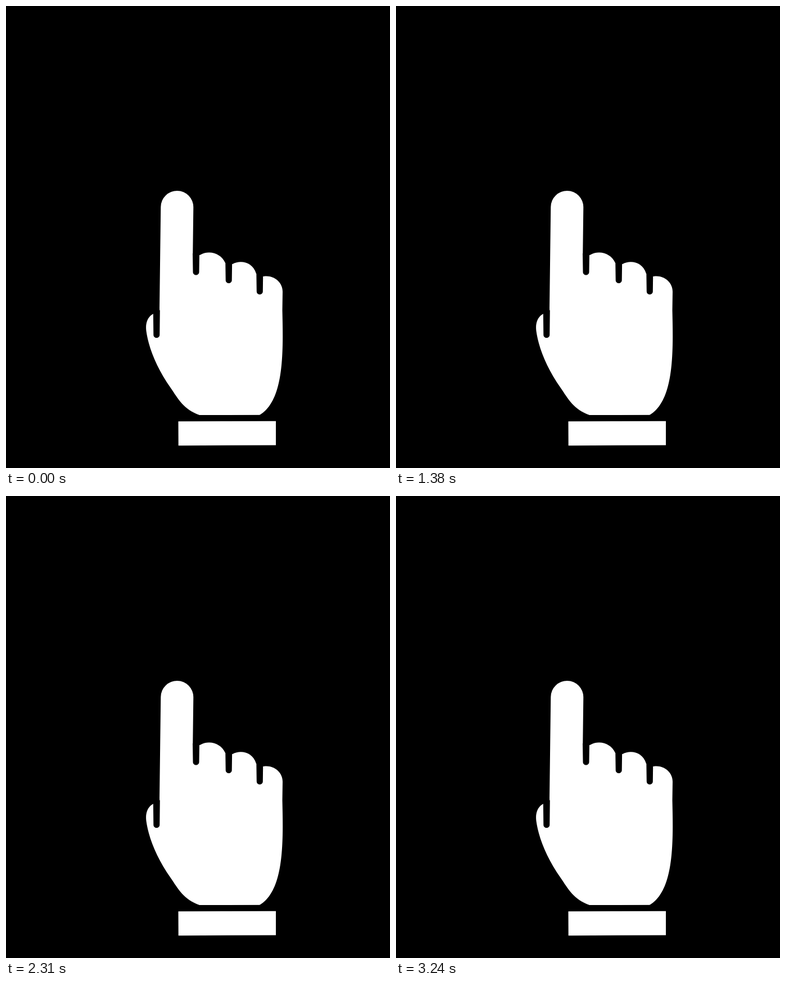
Animation, 683 px wide and 820 px high, one loop 3.84 s. Source, as an HTML page:

```html
<!DOCTYPE html>
<html lang="en">
<head>
<meta charset="utf-8">
<title>Tapping hand</title>
<style>
  html, body { margin: 0; width: 100%; height: 100%; overflow: hidden; background: #000; }
  svg { display: block; width: 100%; height: 100%; }
  .skin { fill: #fff; stroke: #000; stroke-width: 22; stroke-linejoin: round; paint-order: stroke; }
  .finger { fill: none; stroke: #fff; stroke-linecap: round; }
  .finger.edge { stroke: #000; }
</style>
</head>
<body>
<svg viewBox="0 0 683 820">
  <circle id="ring" cx="294.5" cy="355.8" fill="none" stroke="#fff"/>
  <path id="edge" class="finger edge"/>
  <path id="palm" class="skin"/>
  <path id="index" class="finger"/>
  <path id="gaps"/>
  <path id="cuff" class="skin"/>
</svg>
<script>
const LOOP = 3840, STEP = 30, FIRST_TAP = 780, TAP_GAP = 930, TAPS = 3;
const PRESS_TIME = 480, RING_START = 150, RING_END = 600;

const index = 'M302 537 C302.8 477 303.5 417 304.3 357';
const cuff = 'M306.5 737.2 Q393 737 480 736.8 L480 779.6 Q393 779.8 306.7 780.2 Z';
const knuckles = `L345 442 C361 432 383 439 390 456
  L403 458 C418 450 439 455 445 475 L458 480 C476 477 492 490 492 507`;
const palm = `M262.5 546 L273 540 L332 442 ${knuckles}
  L491.5 540 C493 610 496 700 451 726 L344 726
  C316 716 306 697 293 678 C268 642 254 608 249.5 577 C247 558 256 549 262.5 546 Z`;

// Dark slot between fingers, slightly wider at the top, with a round end.
const gap = (x, top, bottom) => `M${x - 6} ${top} L${x - 5.5} ${bottom}
  C${x - 5.5} ${bottom + 7.3} ${x + 5.5} ${bottom + 7.3} ${x + 5.5} ${bottom} L${x + 6} ${top} Z`;
const gaps = gap(267.8, 540, 583.5) + gap(338, 439, 472) + gap(396.2, 453, 486.5) + gap(451.3, 472, 506.5);

const set = (id, attributes) => {
  for (const name in attributes) document.getElementById(id).setAttribute(name, attributes[name]);
};

// Tilts every point of a path; the lean grows with the cube of the height above the wrist.
const bend = (path, amount) => path.replace(/([\d.]+) ([\d.]+)/g, (_, px, py) => {
  const x = +px, y = +py, height = (737 - y) / 400, lean = height ** 3;
  const right = from => Math.max(0, x - from);
  const dx = 0.018 * right(320) + 3.5 * height - lean * (14 + 0.2 * right(345));
  const dy = 0.26 * lean * (400 - x) - 0.035 * right(400);
  return `${x + dx * amount} ${y + dy * amount}`;
});

function drawHand(press) {
  const finger = bend(index, press), width = 58 - 1.4 * press;
  set('edge', { d: finger, 'stroke-width': width + 22 });
  set('index', { d: finger, 'stroke-width': width });
  set('palm', { d: bend(palm, press) });
  set('gaps', { d: bend(gaps, press) });
  set('cuff', { d: bend(cuff, press) });
}

function drawRing(u) {
  const outer = 86.8 + 115 * Math.sin(0.0035 * (u - 360));
  const width = 10.3 + 0.23 * outer;
  const visible = u >= RING_START && u < RING_END;
  set('ring', {
    r: visible ? outer - width / 2 : 0,
    'stroke-width': width,
    'stroke-opacity': visible ? 0.8 - u / 1200 : 0
  });
}

function draw() {
  const t = Math.floor(performance.now() % LOOP / STEP) * STEP - FIRST_TAP;
  const u = t >= 0 && t < TAPS * TAP_GAP ? t % TAP_GAP : -STEP;
  const phase = Math.min(1, (u + STEP) / (PRESS_TIME + STEP));
  drawHand((1 - Math.cos(2 * Math.PI * phase)) / 2);
  drawRing(u);
  requestAnimationFrame(draw);
}
draw();
</script>
</body>
</html>
```
